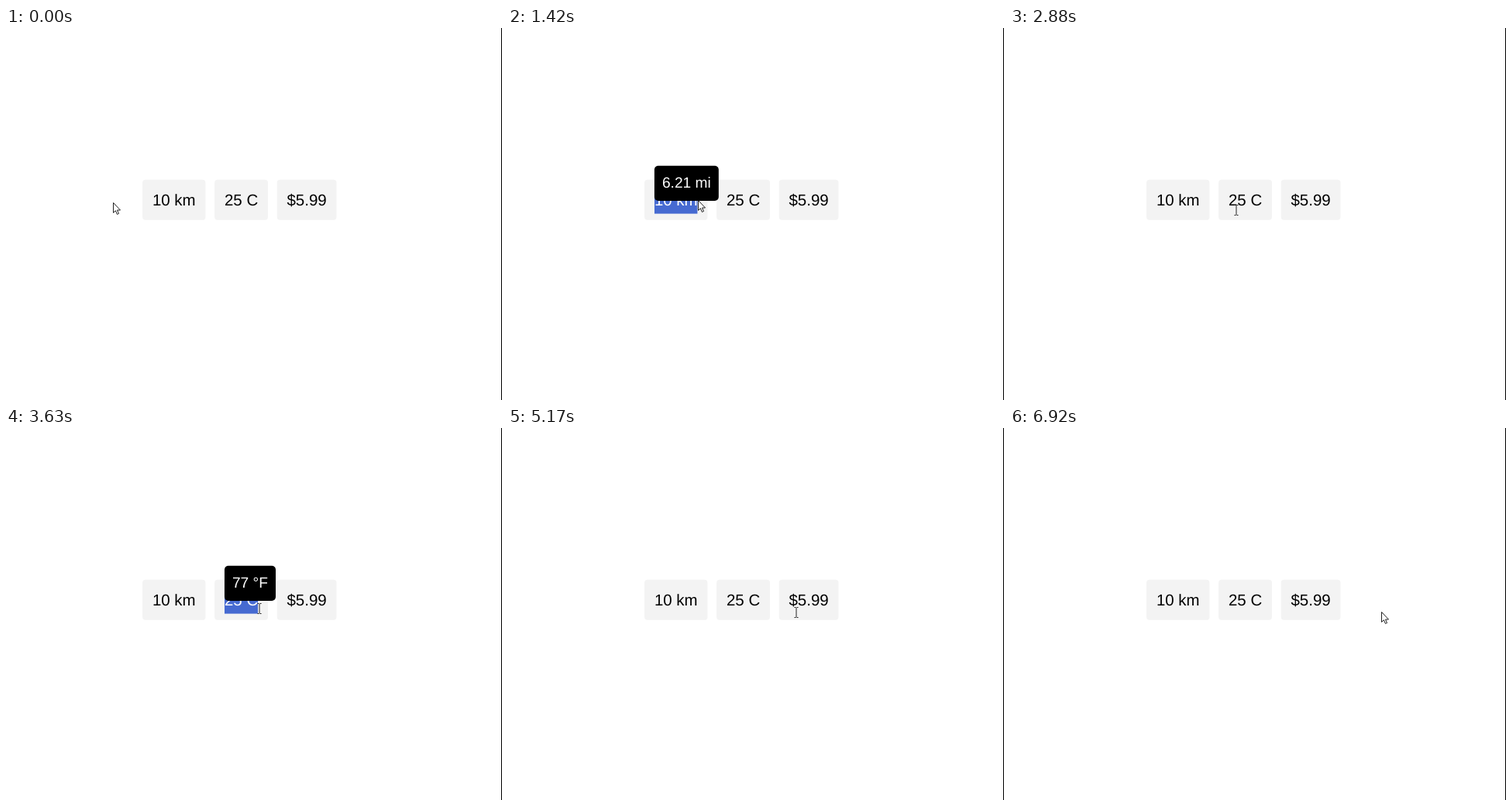
An HTML page that plays this animation: 640x480 px, repeating every 8000 ms.

```html
<!DOCTYPE html>
<html lang="en">
<head>
<meta charset="utf-8">
<title>Unit conversion on selection</title>
<style>
  html, body { margin: 0; width: 100%; height: 100%; overflow: hidden; background: #fff; }
  #stage { display: block; }
  text {
    font: 20.48px "Liberation Sans", Arial, sans-serif;
    text-rendering: geometricPrecision;
  }
  .light { fill: #fff; }
  .tip text { font-size: 19.2px; }
  #cursor { stroke: #222; }
</style>
</head>
<body>
<svg id="stage" width="640" height="480">
  <rect x="639" width="1" height="480"/>
  <g id="page"></g>
  <g id="tips"></g>
  <g id="cursor">
    <path id="arrow" d="M.5 .5V13.4L3.4 10.7 5.4 15.4 7.5 14.5 5.5 10H9.5Z" fill="#fff"/>
    <path id="beam" d="M-2.5-6.5H-.5M.5-6.5H2.5M0-6V6M-2.5 6.5H-.5M.5 6.5H2.5" fill="none"/>
  </g>
</svg>
<script>
const LOOP = 8000, LEFT = 176.1, PAD = 12.8, GAP = 11.7, TIP_PAD = 10;
const LINE = { top: 203.8, height: 36, base: 229.1 };
const TIP = { top: 177.7, height: 45.2, base: 206.4 };
const $ = id => document.getElementById(id);

// drag: selecting starts, show: tip appears, clear: click that ends it all
const items = [
  { text: '10 km', tip: '6.21 mi', drag: 700, show: 1420, clear: 2210 },
  { text: '25 C', tip: '77 °F', drag: 3040, show: 3630, clear: 4830 },
  { text: '$5.99', tip: '5.12 EUR', drag: 5210, show: 5630, clear: 6380 }
];
const CLICK = 45;

const home = { x: 138, y: 225 };
// start, end, x, y
const moves = [
  [80, 600, 192, 232], [700, 1250, 245, 222], [1420, 1830, 290, 231],
  [2210, 2870, 292, 235], [2890, 2960, 286, 234], [3040, 3590, 327, 233],
  [3880, 4330, 366, 241], [4640, 4670, 368, 236], [5140, 5170, 372, 238],
  [5190, 5600, 416.4, 222], [5750, 5920, 481, 237], [6890, 6920, 479, 237]
];

function add(parent, tag, attrs, text = '') {
  const el = document.createElementNS('http://www.w3.org/2000/svg', tag);
  for (const name in attrs) el.setAttribute(name, attrs[name]);
  el.textContent = text;
  return parent.appendChild(el);
}

const pen = document.createElement('canvas').getContext('2d');
function widthOf(text, size) {
  pen.font = `${size}px "Liberation Sans", Arial, sans-serif`;
  return pen.measureText(text).width;
}

let left = LEFT;
for (const it of items) {
  it.ends = [...it.text].map((c, i) => widthOf(it.text.slice(0, i + 1), 20.48));
  it.width = it.ends[it.ends.length - 1];
  it.x = left + PAD;
  it.tipWidth = widthOf(it.tip, 19.2) + 2 * TIP_PAD;
  const boxWidth = it.width + 2 * PAD;

  add($('page'), 'rect', {
    x: left, y: LINE.top - 8, width: boxWidth, height: LINE.height + 16, rx: 4, fill: '#f3f3f3'
  });
  add($('page'), 'text', { x: it.x, y: LINE.base }, it.text);

  it.mark = add($('page'), 'svg', { x: it.x, y: LINE.top, height: LINE.height, width: 0 });
  add(it.mark, 'rect', { width: it.width, height: LINE.height, fill: '#466ad1' });
  add(it.mark, 'text', { y: LINE.base - LINE.top, class: 'light' }, it.text);

  it.label = add($('tips'), 'g', { class: 'tip' });
  add(it.label, 'rect', { x: it.x, y: TIP.top, width: it.tipWidth, height: TIP.height, rx: 5 });
  add(it.label, 'text', { x: it.x + TIP_PAD, y: TIP.base, class: 'light' }, it.tip);
  left += boxWidth + GAP;
}

const ease = p => p * p * (3 - 2 * p);

function cursorAt(t) {
  let { x, y } = home;
  for (const [from, to, toX, toY] of moves) {
    const k = ease(Math.min(1, Math.max(0, (t - from) / (to - from))));
    x += (toX - x) * k;
    y += (toY - y) * k;
  }
  return { x, y };
}

const tipShown = (it, t) => t >= it.show && t < it.clear + CLICK;
const overTip = (it, { x, y }) => x > it.x && x < it.x + it.tipWidth && y < TIP.top + TIP.height;
const overText = (it, { x }) => x > it.x - 1 && x < it.x + it.width + 3;

// A letter is selected once the cursor passes its middle.
function markWidth(it, t, x) {
  if (t < it.drag || t >= it.clear) return 0;
  if (t >= it.show) return it.width;
  return it.ends.reduce((w, end, i) => x - it.x > ((it.ends[i - 1] || 0) + end) / 2 ? end : w, 0);
}

function draw(t) {
  const at = cursorAt(t);
  const beam = items.some(it => overText(it, at)) &&
    !items.some(it => tipShown(it, t) && overTip(it, at));
  $('cursor').setAttribute('transform', `translate(${at.x} ${at.y})`);
  $('beam').style.display = beam ? '' : 'none';
  $('arrow').style.display = beam ? 'none' : '';
  for (const it of items) {
    it.mark.setAttribute('width', markWidth(it, t, at.x));
    it.label.style.display = tipShown(it, t) ? '' : 'none';
  }
}

const start = performance.now();
function tick() {
  draw((performance.now() - start) % LOOP);
  requestAnimationFrame(tick);
}
tick();
</script>
</body>
</html>
```
